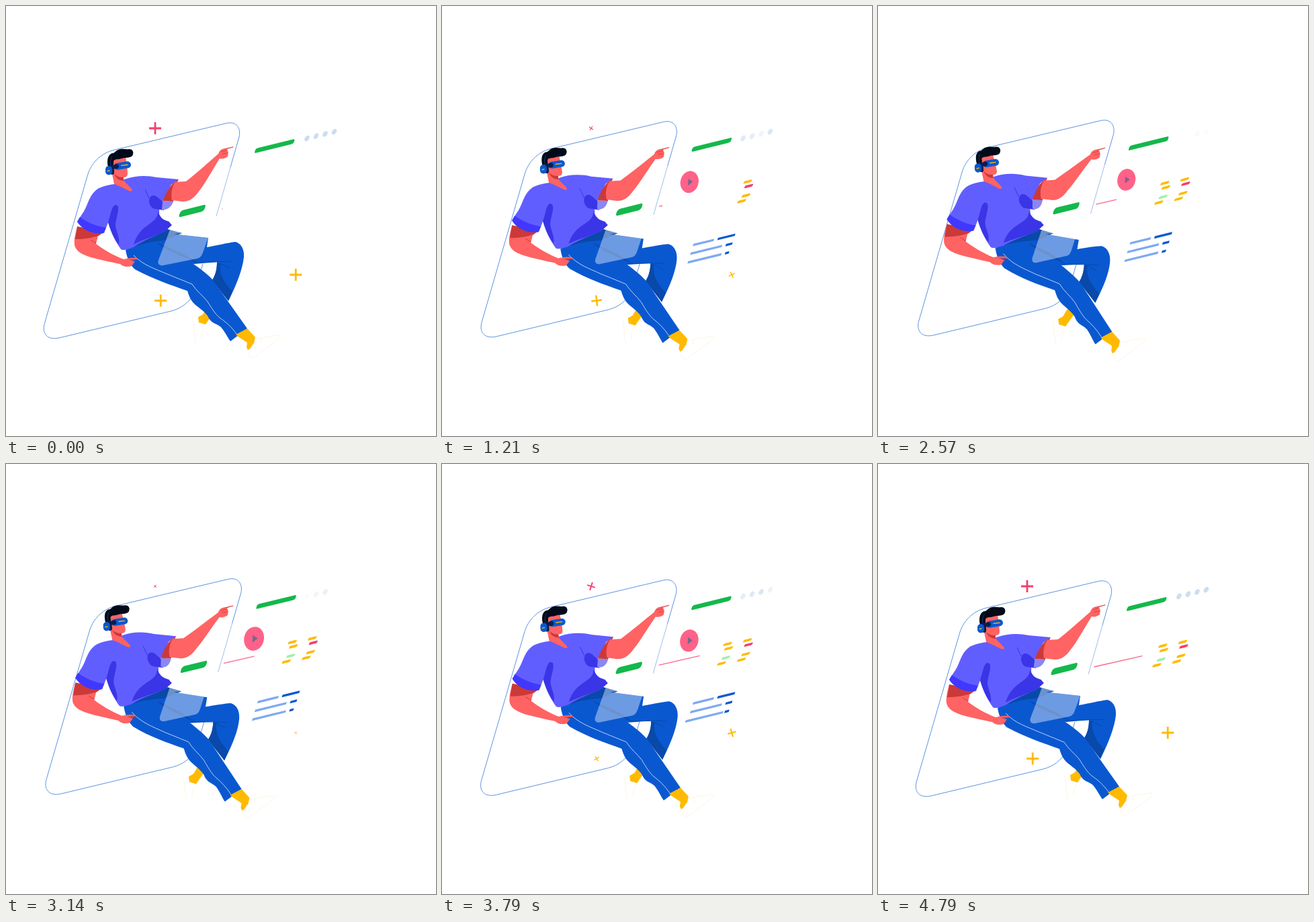
An HTML page with a canvas for the animation above (4.87 s loop, 640x640 px).

```html
<!DOCTYPE html>
<html lang="en">
<head>
<meta charset="utf-8">
<title>Virtual reality</title>
<style>
html, body { margin: 0; width: 100%; height: 100%; overflow: hidden; background: #fff; }
canvas { display: block; }
</style>
</head>
<body>
<canvas id="stage" width="640" height="640"></canvas>
<script>
const ctx = document.getElementById('stage').getContext('2d');
const LOOP = 4870, END = 4790, FPS = 14;
const BLUE = '#0a58d0', NAVY = '#0849a9', INK = '#04204f', SKIN = '#ff6363', RUST = '#cb3939',
  YELLOW = '#ffba00', VIOLET = '#615eff', INDIGO = '#3a35e6', GREEN = '#14b84b', PINK = '#f43f6b',
  CREAM = '#fff3da';

// Each joint: place at rest, then how far the sway carries it
const joints = {
  crown: [180, 218, -7.5, -3.5],
  chin: [170, 258, -3.5, -4],
  shoulder: [130, 290, -3.5, -4],
  hip: [150, 357, -3.5, -3.5],
  elbow: [262, 278, -5, -2.5],
  finger: [338, 210, 0, 1.5],
  waist: [246, 326, 0, 0],
  lap: [299, 348, -2, 3],
  farKnee: [350, 364, -9, 7],
  calf: [308, 398, -8, 3],
  nearKnee: [268, 424, -7, -1],
  foot: [365, 500, -11, 5]
};

let time = 0, sway = 0;

const clamp = v => Math.max(0, Math.min(1, v));
const ease = v => (1 - Math.cos(Math.PI * clamp(v))) / 2;
const dip = (start, low, end) =>
  time < low ? 1 - ease((time - start) / (low - start)) : ease((time - low) / (end - low));
const overshoot = v => v * (3 - 2 * v);
const popIn = (start, length) => overshoot(clamp((time - start) / length));
const popOut = (start, length) => overshoot(1 - clamp((time - start) / length));

// Joints pull nearby points along, weighted by distance
function warp(x, y) {
  let sum = 0, dx = 0, dy = 0;
  for (const [jx, jy, mx, my] of Object.values(joints)) {
    const weight = ((x - jx) ** 2 + (y - jy) ** 2 + 150) ** -1.5;
    sum += weight;
    dx += weight * mx;
    dy += weight * my;
  }
  return `${x + sway * dx / sum},${y + sway * dy / sum}`;
}

const bend = d => new Path2D(d.replace(/(-?[\d.]+),(-?[\d.]+)/g, (_, x, y) => warp(+x, +y)));

function fill(color, path) {
  ctx.fillStyle = color;
  ctx.fill(path);
}

function stroke(color, width, path) {
  ctx.strokeStyle = color;
  ctx.lineWidth = width;
  ctx.stroke(path);
}

const shape = (color, d) => fill(color, bend(d));
const line = (color, width, d) => stroke(color, width, bend(d));

function ellipse(color, x, y, rx, ry, turn) {
  const path = new Path2D();
  path.ellipse(x, y, rx, ry, turn, 0, 7);
  fill(color, path);
}

function drift(dx, dy, draw) {
  ctx.save();
  ctx.translate(dx * sway, dy * sway);
  draw();
  ctx.restore();
}

// Slanted bar around its centre
function bar(color, x, y, w, h, scale = 1, round = .5) {
  if (scale <= 0) return;
  ctx.save();
  ctx.transform(scale, -.245 * scale, -.28 * scale, scale, x, y);
  const path = new Path2D();
  path.roundRect(-w / 2, -h / 2, w, h, [h * round, h * round * .6]);
  fill(color, path);
  ctx.restore();
}

function plus(color, x, y, size, turn) {
  ctx.save();
  ctx.translate(x, y);
  ctx.rotate(turn * (1 - size));
  ctx.scale(size, size);
  stroke(color, 2.8, new Path2D('M-9,0H9M0,-9V9'));
  ctx.restore();
}

function panel() {
  stroke('#5c92e0', 1, new Path2D(`M334,240 L347,195 C350,182 343,171 328,174.5 L160,214.5
    C139,220 127,235 122,250 L57.5,472 C53,487 61,498 79,494 L246,454 C262,450 273,440 280,428
    L293,384`));
  stroke('#9dbdec', 1, new Path2D('M334,240 L313,313'));
}

function farFoot() {
  fill(YELLOW, new Path2D('M286,463 L293,459 L302,444 L312,453 L301,468 L297,474 L287,471 Z'));
  stroke(CREAM, .8, new Path2D('M277,463 C281,475 279,485 283,501 M297,475 C292,481 291,487 291,495'));
}

function legs() {
  shape(BLUE, `M235,335 L262,338 L250,339.5 L301,345 L299,359 C315,356 328,353 341,351
    C350,353 355,362 354,374 C352,392 344,413 331,439 L307,408 C312,400 314,392 314,381
    L280,384 L240,372 Z`);
  shape(NAVY, `M314,381 C314,392 312,400 307,408 L331,439 L337,425
    C328,415 317,402 319,384 Z`);
  line(NAVY, 1, 'M278,382 L336,380 M318,383 L333,390');
  shape(BLUE, `M178,363 L210,346 L240,334 C258,352 272,372 279,384 C292,393 302,401 308,408
    L359,480 L334,499 C330,494 328,488 320,478 C312,471 306,474 300,461 C294,453 285,448 280,443
    C274,437 272,430 270,424 C245,415 220,407 192,392 C184,385 180,375 178,363 Z`);
  shape(NAVY, 'M180,363 L215,344 L240,332 L262,338 L236,349 C218,350 200,354 180,363 Z');
  shape(NAVY, 'M224,352 L262,368 L286,382 C264,374 240,364 224,352 Z');
  line('#b8d2f5', 1, `M190,371 C204,386 222,391 240,399 L277,414 C283,424 294,432 300,440
    C306,450 312,459 318,464 C327,470 336,478 343,488`);
  shape(YELLOW, `M342,489 L359,480 L371,493 L369,502 C365,506 364,511 360,512 L358,508
    L359,501 C354,497 347,494 342,489 Z`);
  line(CREAM, .8, `M371,496 L384,493 L405,490 C410,489 410,492 404,497 L369,523
    C362,527 365,519 359,512 M380,494 L379,502`);
}

// Translucent sheet, seen only where it covers the trousers
function sheet() {
  ctx.save();
  ctx.clip(bend(`M178,363 L240,331 L262,338 L250,339.5 L301,345 L299,359 L341,351 L314,381
    L280,384 L308,408 L270,424 L192,392 Z`));
  ctx.translate(227 + 3 * sway, -4 * sway);
  ctx.scale(1 - .12 * sway, 1);
  fill('rgba(255,255,255,.4)', new Path2D(
    'M21,322 H82 L66,367 C64,372 62,375 57,376 L7,386 C1,387 -2,384 0,378 Z'));
  ctx.restore();
}

function torso() {
  shape(SKIN, `M106,329 C103,339 101,348 102,356 C104,365 114,371 130,375 C145,379 160,382 170,384
    C174,388 180,389 187,387 L192,380 L186,379 L197,377 L195,375 C187,374 180,376 175,377
    C159,371 143,361 134,354 L137,342 L146,335 Z`);
  line(RUST, 1, 'M126,348 L134,353 M184,378 L195,377');
  shape(RUST, 'M106,328 L103,347 C116,347 128,345 138,342 L146,336 Z');
  shape(VIOLET, `M162,265 C147,267 138,270 133,275 C123,283 121,300 113,310 L106,321
    C113,332 130,340 146,338 L152,322 C157,340 164,352 171,362 C174,365 185,361 190,359
    C207,347 224,342 238,334 L246,326 L243,321 L232,317 C226,311 229,307 228,302
    L238,302 L233,290 L246,266 L257,258 L224,255 C210,252 193,252 176,258 Z`);
  shape('#4038ff', 'M110,314 L106,321 C113,333 130,341 145,338 L149,330 C136,328 122,323 110,314 Z');
  shape(INDIGO, `M163,296 C157,297 156,311 152,322 C157,338 162,348 168,355
    C170,343 162,333 163,324 C165,312 169,302 166,297 Z`);
  shape(INDIGO, `M226,306 C226,326 200,322 190,355 C207,346 224,342 238,334 L247,326
    L242,321 C233,319 229,313 226,306 Z`);
  shape(INDIGO, 'M215,284 C210,290 215,302 222,302 L235,304 L233,291 C228,288 222,278 215,284 Z');
  line(INDIGO, 1, 'M207,273 L213,286');
  shape('#8987f5', 'M233,290 L249,291 C246,299 241,304 232,303 C232,298 233,296 233,290 Z');
}

function pointingArm() {
  shape(RUST, 'M257,258 C246,264 240,274 233,290 L249,291 L255,262 Z');
  shape(SKIN, `M252,262 L268,261 C285,248 302,232 316,220 C318,214 322,212 327,212 L339,209
    L338,210 L329,213 L331,218 L330,224 C326,227 322,228 318,227 C306,246 296,265 287,276
    C280,286 272,292 262,291 L247,289 C245,279 247,269 252,262 Z`);
  line(RUST, .8, 'M320,217 L328,215 M322,220 L329,219 M326,213 L338,210');
}

function head() {
  shape(SKIN, `M159,228 L178,225 L180,236 L181,249 C181,255 177,255 174,255 L176,261 L187,272
    C190,277 184,276 181,274 C173,270 167,267 161,265 L158,250 Z`);
  shape(RUST, 'M161,249 C164,254 169,255 175,255 L175,260 C168,260 163,256 161,249 Z');
  shape('#000a18', `M152,240 C149,227 153,219 160,219 L165,215 C172,211 178,214 183,213
    C189,213 191,218 188,223 C184,227 176,225 172,227 C166,229 162,227 160,231 L160,241 Z`);
  ctx.lineCap = 'round';
  line('#17366e', 1, 'M158,224 C155,229 155,235 156,239');
  line(INK, 6, 'M158,239 L158,248');
  line(BLUE, 10, 'M153,243 L153,246.5');
  line(BLUE, 10, 'M166,238.7 L181,236.3');
  line(INK, 7, 'M163.5,239 L164.5,238.8');
  line(YELLOW, 1.4, 'M172,237.4 L181,236.2');
  line(YELLOW, 1.4, 'M151,245.6 L154,245');
  ctx.lineCap = 'butt';
}

function greenBars() {
  bar(GREEN, 399.8, 208.5, 58.5, 7.2);
  bar(GREEN, 277.2, 305, 38, 10);
}

function dots() {
  for (let i = 0; i < 4; i++) {
    ctx.globalAlpha = dip(200, 1850 + 420 * ((6 - i) % 4), END);
    ellipse('#cdddf1', 448 + 13.5 * i, 197 - 3.3 * i, 3.1, 4.7, .6);
  }
  ctx.globalAlpha = 1;
}

function playButton() {
  const beat = .95 + .05 * Math.cos(2 * Math.PI * (time - 1830) / 1430);
  const size = beat * popIn(450, 450) * popOut(3950, 500);
  ctx.save();
  ctx.translate(366.8, 265.5);
  ctx.scale(size, size);
  ellipse('#ff6288', 0, 0, 14.8, 18.2, .25);
  fill('#7c6590', new Path2D('M-2,-5.5 L5.5,-.5 L-2.5,6 Z'));
  ctx.restore();
}

// Two columns of the same four rows, popping up one after another
function listBars() {
  const rows = [[451, 285.5], [444.5, 294], [455, 271.5], [453.5, 265]];
  for (let n = 0; n < 8; n++) {
    const column = n >> 2, [x, y] = rows[n % 4];
    const color = n === 2 ? PINK : n === 4 ? '#a0f0aa' : YELLOW;
    bar(color, x - 29.6 * column, y + 5.5 * column, 12.5, 4, popIn(200 + 290 * n, 300));
  }
}

function textLines() {
  [[31, 26], [47, 10], [50, 6]].forEach(([long, short], row) => {
    const size = popIn(500 + 120 * row, 400) * popOut(3920 - 130 * row, 550);
    const left = 372.5 - 4 * row, base = 358.3 + 13 * row;
    const segment = (color, start, width) => {
      const middle = start + width / 2;
      bar(color, left + middle, base - .245 * middle, width * size, 3.6, size > 0 ? 1 : 0, .1);
    };
    segment('#7eaaf0', 0, long);
    segment(BLUE, long + 5.5, short);
  });
}

function pointerLine() {
  const reach = 1 + 71 * ease(time / END) ** 1.5;
  stroke('#f9668a', 1.3, new Path2D(`M321.5,302 l${reach},${-.229 * reach}`));
}

function draw() {
  ctx.clearRect(0, 0, 640, 640);
  drift(3.5, -4, panel);
  drift(-18, 3, farFoot);
  legs();
  sheet();
  torso();
  pointingArm();
  head();
  dots();
  drift(3, -4, greenBars);
  drift(3, -7, playButton);
  drift(3, -7, listBars);
  drift(3, -7, pointerLine);
  drift(2.5, -5, textLines);
  plus(PINK, 222, 182, dip(0, 2150, END), 1);
  plus(YELLOW, 431.3, 400, dip(200, 2350, 4600), -1);
  plus(YELLOW, 230.2, 438.5, dip(750, 2850, END), -1);
}

function tick() {
  const step = Math.floor((performance.now() % LOOP + 8) * FPS / 1000);
  time = Math.min(END, step * 1000 / FPS);
  sway = ease(2 * Math.min(time, END - time) / END);
  draw();
  requestAnimationFrame(tick);
}
tick();
</script>
</body>
</html>
```
